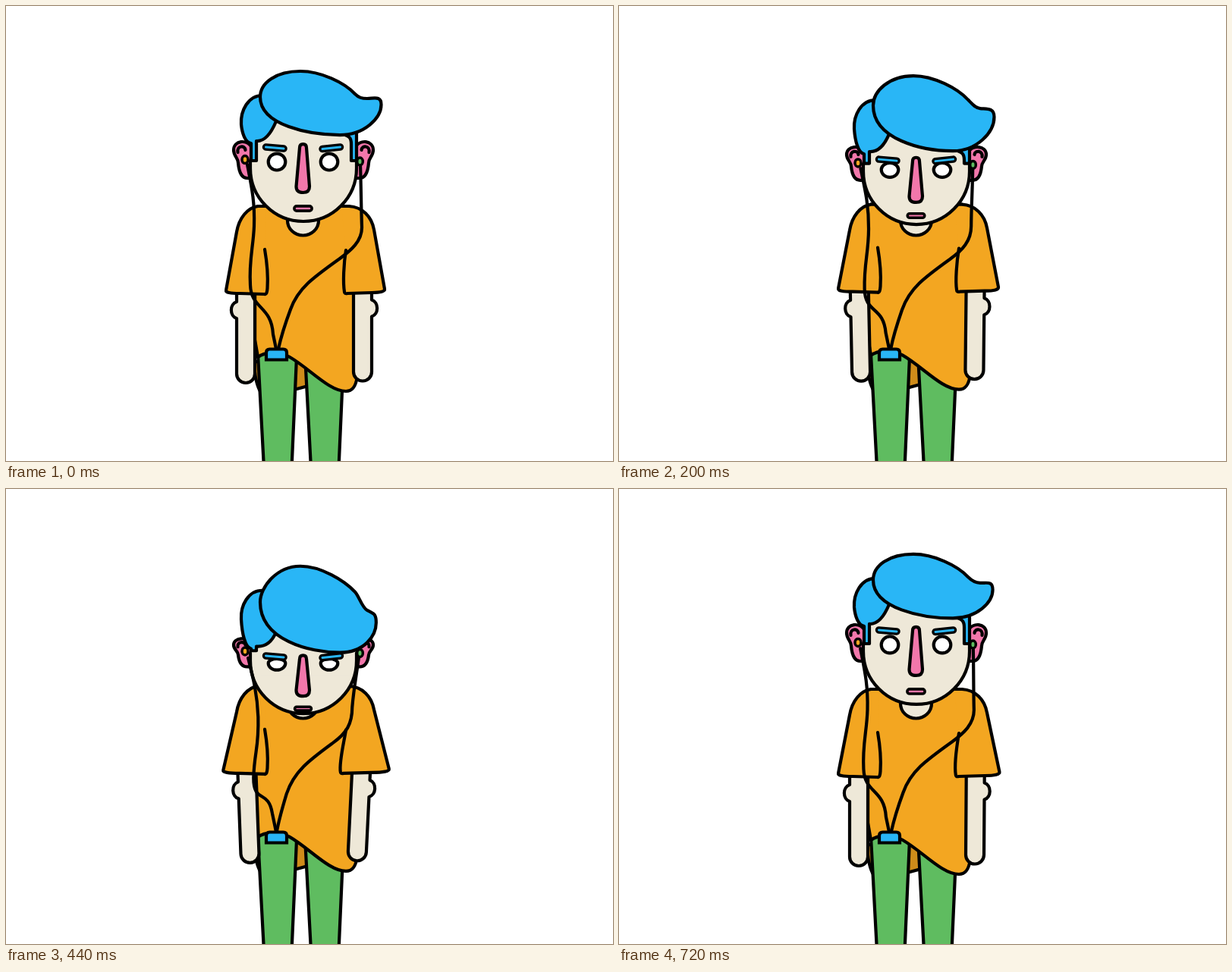
Write an HTML page with a canvas that moves like this. It is 800x600 px and loops after 740 ms.

```html
<!DOCTYPE html>
<html lang="en">
<head>
<meta charset="utf-8">
<title>Nodding along</title>
<style>
  html, body { margin: 0; width: 100%; height: 100%; overflow: hidden; background: #fff; }
  canvas { display: block; width: 800px; height: 600px; }
</style>
</head>
<body>
<canvas id="stage" width="800" height="600"></canvas>
<script>
const ctx = document.getElementById('stage').getContext('2d');
const LOOP = 740;
const TIMES = [0, 80, 200, 360, 520, 620, 720];

// Each track holds one value per entry of TIMES; most are offsets from rest.
const TRACKS = {
  crown:   [0, 1, 6, 16, 13, 5, 0],
  brow:    [0, 3, 16, 37, 25.5, 9, 0],
  chin:    [0, 1, 4, 12.5, 10, 4.5, 0],
  fringe:  [0, 4, 21, 47.5, 37, 15, 0.5],
  ear:     [0, 1, 7, 19, 15, 6, 0],
  lid:     [11, 10.5, 9, 4, 8.5, 10.5, 11],
  notch:   [122, 124, 135, 158, 156, 137, 124],
  slope:   [0, 0, 0.1, 0.35, 0.7, 0.6, 0.05],
  tipX:    [494.5, 494.5, 494.5, 490, 486.5, 488.5, 492.5],
  tipY:    [130, 132, 146, 174, 172, 152, 133],
  shirt:   [0, -0.4, -2.3, -5, -2.5, -0.5, 0],
  sleeveL: [290, 290, 289, 287, 286, 287.5, 289],
  sleeveR: [499, 499, 500, 503.5, 505.5, 504.5, 501.5],
  armL:    [0, 0.5, 3, 6, 4, 1.5, 0],
  armR:    [0, 0, 1.5, 6, 7, 4, 1],
  wire:    [0, 0, 0.4, 1, 0.97, 0.48, 0.1]
};

const C = {
  line: '#000', skin: '#eee8d8', hair: '#29b6f6', shirt: '#f3a621',
  back: '#cf8c1a', pants: '#5fbc60', pink: '#f277ab', white: '#fff'
};

// Periodic cubic interpolation through the track values.
function sample(v, t) {
  const n = TIMES.length;
  const time = i => TIMES[(i + n) % n] + LOOP * Math.floor(i / n);
  const val = i => v[(i + n) % n];
  const tan = i => (val(i + 1) - val(i - 1)) / (time(i + 1) - time(i - 1));
  let i = n - 1;
  while (TIMES[i] > t) i--;
  const d = time(i + 1) - time(i);
  const u = (t - time(i)) / d, u2 = u * u, u3 = u2 * u;
  return (2 * u3 - 3 * u2 + 1) * val(i) + (u3 - 2 * u2 + u) * d * tan(i)
    + (3 * u2 - 2 * u3) * val(i + 1) + (u3 - u2) * d * tan(i + 1);
}

function paint(path, fill, width = 4.2) {
  if (fill) { ctx.fillStyle = fill; ctx.fill(path); }
  if (width) { ctx.lineWidth = width; ctx.strokeStyle = C.line; ctx.stroke(path); }
}

const shape = (d, fill, width) => paint(new Path2D(d), fill, width);

// Transforms the outline only, so the line weight stays even.
function warped(d, fill, matrix) {
  const p = new Path2D();
  p.addPath(new Path2D(d), matrix);
  paint(p, fill);
}

function moved(fn, x, y, flip = false) {
  ctx.save();
  ctx.translate(x, y);
  ctx.scale(flip ? -1 : 1, 1);
  fn();
  ctx.restore();
}

function oval(x, y, rx, top, bottom, fill, width) {
  shape(`M${x - rx} ${y}A${rx} ${top} 0 0 1 ${x + rx} ${y}A${rx} ${bottom} 0 0 1 ${x - rx} ${y}Z`, fill, width);
}

// Blend two paths that share the same commands.
function blend(a, b, k) {
  const nums = b.match(/[\d.]+/g);
  let i = 0;
  return a.replace(/[\d.]+/g, n => +n + (nums[i++] - n) * k);
}

function legs(s) {
  shape(`M327 ${470 + s}Q328 ${497 + s} 336 ${510 + s}Q370 ${510 + s} 398 ${501 + s}V${450 + s}Z`, C.back);
  shape('M331 440L340 610H376.500L384 440Z', C.pants);
  shape('M393 440L402 610H438.500L446 440Z', C.pants);
}

function torso() {
  shape('M332 264H452L463 300V488C461 503 456 508 448 508C426 508 400 478 374 463' +
    'C360 455 341 456 332 463L328 440V300Z', C.shirt);
}

function arm(dx) {
  ctx.save();
  ctx.translate(316, 340);
  ctx.rotate(-Math.atan(dx / 143));
  ctx.translate(-316, -340);
  shape('M304 370V390C294.500 393 294.500 409 304 412V485A12 12 0 0 0 328 485V370', C.skin);
  ctx.restore();
}

function sleeves(p) {
  const l = p.sleeveL, r = p.sleeveR, c = 446 - 0.9 * (r - 499);
  shape(`M341 321Q346 350 344.500 372Q344 381 341 380L308 379Q${l - 1} 379 ${l} 375` +
    'L304 298C307 280 318 266 332 264H342', C.shirt);
  shape(`M448 322C445 340 ${c - 2} 365 ${c} 377Q${c} 380 ${c + 4} 379L482 378` +
    `Q${r + 1} 378 ${r} 373L485 295C482 278 470 265 452 264H442`, C.shirt);
}

function ear(matrix) {
  warped('M324 187C318 175 300 177 300 190C300 198 306 200 306 207C307 218 310 227 318 227H326', C.pink, matrix);
  warped('M305.500 193C304 184 315 183 315.500 190', null, matrix);
}

function backHair(p, burn) {
  const top = 118 + p.crown, side = top + 38;
  const k = 178 + 0.87 * p.brow, end = 152 + 0.8 * p.fringe;
  shape(`M338 ${top}C319 ${top} 309 ${side - 18} 310 ${side}` +
    `C311 ${(side + k) / 2} 315 ${k + 2} 323 ${k + 3}V${Math.max(burn, k + 1)}H330V${k}` +
    `C343 ${k + 1} 351 ${end + 12} 356 ${end}Z`, C.hair);
  const f = 170 + p.fringe;
  if (f + 4 < burn) {
    shape(`M444 ${f - 1}C453 ${f + 2} 455 ${f + 4} 455 ${Math.min(f + 12, burn)}V${burn}H462V${f - 10}Z`, C.hair);
  }
}

function quiff(p) {
  const top = 86 + p.crown, left = 120 + 1.85 * p.crown, bend = 116 + 1.25 * p.crown;
  const f = 170 + p.fringe, { notch: n, slope: m, tipX: x, tipY: y } = p;
  shape(`M335 ${left}C335 ${left - 19} 356 ${top} 388 ${top}` +
    `C415 ${top} 446 ${bend - 15} 460 ${bend}C465 ${bend + 5} 469 ${n - 7 * m} 476 ${n}` +
    `C485 ${n + 9 * m} ${x} ${y - 12} ${x} ${y}` +
    `C${x} ${y + 0.45 * (f - y)} 472 ${f} 440 ${f}` +
    `C400 ${f} 335 ${left + 0.75 * (f - left)} 335 ${left}Z`, C.hair);
}

function brow(x1, y1, x2, y2) {
  for (const [w, c] of [[9.5, C.line], [3, C.hair]]) {
    ctx.lineWidth = w;
    ctx.strokeStyle = c;
    ctx.stroke(new Path2D(`M${x1} ${y1}L${x2} ${y2}`));
  }
}

function features(p) {
  const b = p.brow, eyeY = 205.5 + 0.48 * b + 0.65 * p.chin;
  for (const x of [357, 426]) {
    oval(x, eyeY, 11.3, p.lid, 11 - 0.06 * b, C.white);
  }
  brow(342.5, 186 + b, 366, 188 + b);
  brow(417, 188.5 + b, 440.5, 186 + b);
  const t = 182 + 1.1 * b, e = 246 + 0.8 * b;
  shape(`M387 ${t + 5}Q387 ${t} 391.500 ${t}Q396 ${t} 396 ${t + 5}L400 ${e - 8}` +
    `Q400 ${e} 391.500 ${e}Q382.500 ${e} 382.500 ${e - 8}Z`, C.pink);
  const h = 3.1 - 0.02 * b, y = 267 + 0.4 * b + 0.75 * p.chin;
  shape(`M383 ${y - h}H400A${h} ${h} 0 0 1 400 ${y + h}H383A${h} ${h} 0 0 1 383 ${y - h}Z`, C.pink, 3.6);
}

function wires(k) {
  shape(blend(
    'M318 209C324 240 328 258 327 290C326 318 320 335 322 368C323 400 350 395 352 433L356 452',
    'M319 222C326 250 331 270 332 300C333 340 327 345 326 380C326 415 346 395 351 428L356 452', k));
  shape(blend(
    'M467 210C468 238 468 265 469 292C469 310 455 322 440 333C405 358 385 372 375 400C366 424 361 443 359 452',
    'M465 222C463 240 459 262 457 288C457 310 449 322 431 335C401 357 380 372 370 402C363 425 359 440 357 452', k));
}

function draw(t) {
  const p = {};
  for (const key in TRACKS) p[key] = sample(TRACKS[key], t);
  ctx.fillStyle = C.white;
  ctx.fillRect(0, 0, 800, 600);
  ctx.lineCap = ctx.lineJoin = 'round';

  legs(p.shirt);
  moved(torso, 0, p.shirt);
  moved(() => arm(p.armL), 0, p.shirt);
  moved(() => arm(p.armR), 786, p.shirt - 2.5, true);
  moved(() => sleeves(p), 0, p.shirt);
  shape('M371 270V283A20.500 19.500 0 0 0 412 283V270', C.skin);

  const squash = 1 - 0.6 * p.ear / 49;
  const earY = 178 + p.ear - 178 * squash;
  ear(new DOMMatrix([1, 0, 0, squash, 0, earY]));
  ear(new DOMMatrix([-1, 0, 0, squash, 784, earY]));

  const cy = 214 + p.chin, bud = 0.62 * p.ear;
  shape(`M322 ${cy - 35}V${cy}A70 70 0 0 0 462 ${cy}V${cy - 35}`, C.skin, 0);
  ctx.fillStyle = C.skin;
  ctx.fillRect(336, 140 + p.fringe, 118, 60);
  shape(`M322 ${cy - 10}V${cy}A70 70 0 0 0 462 ${cy}V${cy - 10}`, null);

  backHair(p, 204 + 0.5 * p.ear);
  features(p);
  quiff(p);
  wires(p.wire);
  oval(315, 202.5 + bud, 4, 5, 5, C.shirt, 3.5);
  oval(466.5, 205 + bud, 3.8, 5, 5, C.pants, 3.5);
  ctx.lineJoin = 'miter';
  shape('M343 466.500V457Q343 452.500 347.500 452.500H365.500Q370 452.500 370 457V466.500Z', C.hair);
}

function tick(now) {
  draw(now % LOOP);
  requestAnimationFrame(tick);
}
draw(0);
requestAnimationFrame(tick);
</script>
</body>
</html>
```
